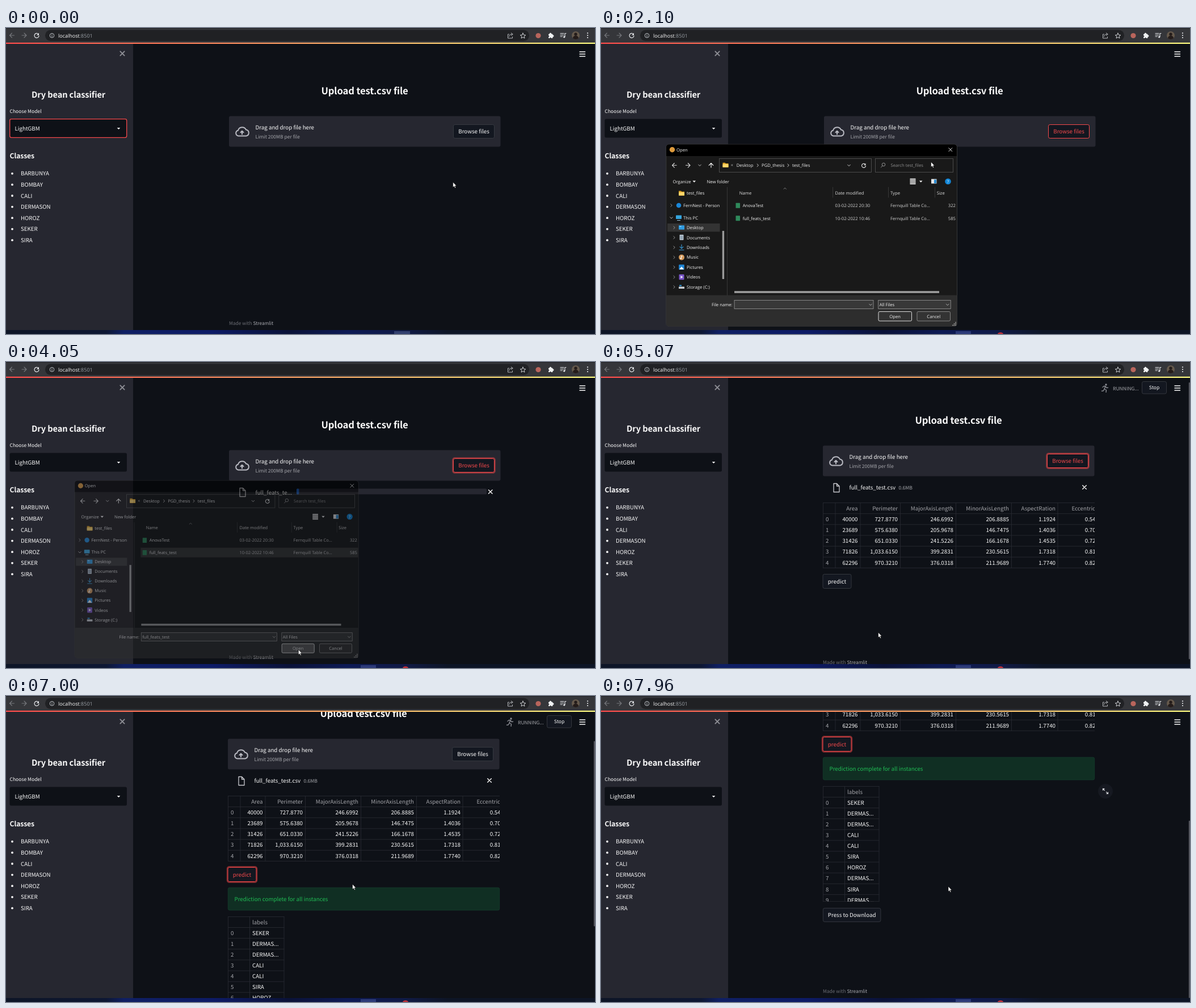
These frames come from a looping animation (1038 px wide and 540 px high, 8 s). An HTML page:

```html
<!DOCTYPE html>
<html lang="en">
<head>
<meta charset="utf-8">
<title>Dry bean classifier</title>
<style>
html,body{margin:0;width:100%;height:100%;overflow:hidden;background:#0e1117}
svg{display:block}
text{font-family:"Noto Sans CJK JP","Noto Sans CJK SC","Noto Sans CJK",sans-serif;fill:#fafafa;white-space:pre;text-rendering:geometricPrecision}
.ui text{font-family:"Open Sans","Noto Sans",sans-serif}
.line{fill:none;stroke:#fff;stroke-width:1;stroke-linecap:round;stroke-linejoin:round}
</style>
</head>
<body>
<svg id="stage" width="1038" height="540" viewBox="0 0 1038 540"></svg>
<script>
const BODY = 9.76, SMALL = 8.54, UI = 7.7, RED = '#f4494b';

// Drawing helpers; text is placed by the middle of its capitals
const text = (x, y, s, size = BODY, attr = '') =>
  `<text x="${x}" y="${(y + size * .365).toFixed(2)}" font-size="${size}" ${attr}>${s}</text>`;
const ui = (x, y, s, fill = '#f0f0f0', attr = '') => text(x, y, s, UI, `style="fill:${fill}" ${attr}`);
const rect = (x, y, w, h, fill, attr = '') =>
  `<rect x="${x}" y="${y}" width="${w}" height="${h}" fill="${fill}" ${attr}/>`;
const dot = (x, y, r, fill, attr = '') => `<circle cx="${x}" cy="${y}" r="${r}" fill="${fill}" ${attr}/>`;
const line = (d, stroke = '#fff', w = 1, attr = '') =>
  `<path class="line" d="${d}" style="stroke:${stroke};stroke-width:${w}" ${attr}/>`;
const group = (id, body, attr = '') => `<g id="${id}" ${attr}>${body}</g>`;
const at = (x, y, body) => `<g transform="translate(${x} ${y})">${body}</g>`;
const gray = 'style="fill:#a3a4a9"', mid = 'text-anchor="middle"', end = 'text-anchor="end"';
const cross = (x, y, r, c, w) => line(`M${x - r} ${y - r}l${2 * r} ${2 * r}m0 ${-2 * r}l${-2 * r} ${2 * r}`, c, w);
const chevron = (x, y, c, down) => line(down ? `M${x - 2.3} ${y - 1.2}l2.3 2.4l2.3 -2.4` : `M${x - 1.2} ${y - 2.3}l2.4 2.3l-2.4 2.3`, c, .9);
const caret = (x, y) => `<path d="M${x - 2.8} ${y - 1.3}h5.6l-2.8 2.9z" fill="#fafafa"/>`;
const arrow = (x, y, turn, c, r = 4) =>
  `<g transform="translate(${x} ${y}) rotate(${turn})">${line(`M${r} 0H${-r}M${-r} 0l${r} ${-r}M${-r} 0l${r} ${r}`, c, 1.1)}</g>`;
const reload = (x, y, r, c) => line(`M${x + r * .75} ${y - r * .65}A${r} ${r} 0 1 0 ${x + r} ${y + .6}`, c, 1.2) +
  `<path d="M${x + r} ${y - r - .6}v${r}h${-r}z" fill="${c}"/>`;

// A button with plain, hovered and focused looks
function button(id, x, y, w, h, label) {
  const box = (c, sw) => rect(x, y, w, h, '#131720', `rx="2.7" stroke="${c}" stroke-width="${sw}"`);
  const word = c => text(x + w / 2, y + h / 2, label, BODY, `${mid} style="fill:${c}"`);
  return group(id, box('#3d4047', .8) + word('#fafafa')) +
    group(id + 'Hover', box(RED, 1) + word(RED)) +
    group(id + 'Focus', rect(x - 1.2, y - 1.2, w + 2.4, h + 2.4, 'none', 'rx="3.5" stroke="#ff4b4b" stroke-opacity=".5" stroke-width="2"') + box(RED, 1) + word(RED));
}

function browser() {
  return `<g class="ui">` + rect(0, 0, 1038, 26, '#35363a') + rect(0, 0, 1038, 1, '#202124') +
    arrow(10.5, 13, 0, '#77797d') + arrow(32, 13, 180, '#77797d') + reload(54, 13.3, 4, '#e8eaed') +
    rect(69, 3.5, 853, 19.5, '#202124', 'rx="9.7"') +
    dot(81, 13.3, 3.8, 'none', 'stroke="#bdc1c6"') + line('M81 13v2.2M81 11.2v.1', '#bdc1c6', 1) +
    text(92, 13.3, 'localhost<tspan style="fill:#9aa0a6">:8501</tspan>', 9) +
    line('M886.5 11h-2v7h8v-2.500M886.500 15c.5-3 2.500-4 5-4M890.300 8.800l3 2.200l-3 2.200', '#c4c7cb', .9) +
    line('M911 9l1.400 3.200l3.400 .300l-2.600 2.300l.8 3.300l-3 -1.800l-3 1.800l.8 -3.300l-2.600 -2.300l3.400 -.300z', '#dfe1e5', .9) +
    dot(938, 13.5, 4.6, '#b9655c') +
    rect(956, 10.500, 7.500, 7.500, '#f1f3f4', 'rx="1"') + dot(959.5, 10.3, 1.700, '#f1f3f4') + dot(963.8, 14, 1.700, '#f1f3f4') + dot(956, 14.5, 1.300, '#35363a') + dot(959.6, 18, 1.300, '#35363a') +
    line('M977 9.500h6M977 12.300h6M977 15h3.500M985 15.500v-6h2', '#e8eaed', 1.100) + dot(983.7, 15.8, 1.600, '#e8eaed') +
    dot(1004, 13, 7, '#65594c') + dot(1004, 11, 2.700, '#241c1a') + `<path d="M999 18a5 4.500 0 0 1 10 0a7 7 0 0 1 -10 0z" fill="#241c1a"/>` +
    [9, 13, 17].map(y => dot(1025, y, 1.1, '#e8eaed')).join('') + `</g>` +
    rect(0, 25.8, 1038, 2.2, 'url(#glow)');
}

function sidebar() {
  const names = ['BARBUNYA', 'BOMBAY', 'CALI', 'DERMASON', 'HOROZ', 'SEKER', 'SIRA'];
  return rect(0, 28, 224, 505, '#262730') + cross(205, 45, 3.6, '#8d8e94', 2) +
    text(110, 117.5, 'Dry bean classifier', 14.6, `${mid} font-weight="600" letter-spacing="-.1"`) +
    text(6.5, 147, 'Choose Model', SMALL) +
    rect(6.5, 160.5, 206.5, 33, '#0e1117', 'rx="2.7"') +
    group('picked', rect(6.7, 160.700, 206, 32.600, 'none', `rx="2.700" stroke="${RED}" stroke-width="1.300"`)) +
    text(15.5, 177.5, 'LightGBM') + caret(198.5, 177.3) +
    text(6.5, 226, 'Classes', 12.2, 'font-weight="600" letter-spacing="-.1"') +
    names.map((n, i) => dot(11, 256.8 + i * 19.6, 1.9, '#fafafa') + text(26, 256.8 + i * 19.6, n)).join('');
}

// Grid lines of a table, given column and row edges
const grid = (xs, ys, w, h) => line(xs.map(x => `M${x} .5V${h}`).join('') + ys.map(y => `M.5 ${y}H${w}`).join(''), '#272a31', .9);

function features() {
  const heads = ['Area', 'Perimeter', 'MajorAxisLength', 'MinorAxisLength', 'AspectRation', 'Eccentricity'];
  const rows = [
    '40000 727.8770 246.6992 206.8885 1.1924 0.5450', '23689 575.6380 205.9678 146.7475 1.4036 0.7018',
    '31426 651.0330 241.5226 166.1678 1.4535 0.7257', '71826 1,033.6150 399.2831 230.5615 1.7318 0.8164',
    '62296 970.3210 376.0318 211.9689 1.7740 0.8260'];
  const right = [61.5, 132, 230, 328, 410, 491.5];
  const edges = [0, 1, 2, 3, 4, 5, 6].map(i => .5 + i * 19.15);
  return `<svg x="393" y="256" width="479" height="117">` +
    grid([.5, 22, 66, 136.5, 234.5, 332.5, 414], edges, 479, 115.4) +
    heads.map((s, i) => text(right[i], 10.3, s, BODY, `${end} ${gray}`)).join('') +
    rows.map((r, j) => text(5, 29.400 + j * 19.15, j, BODY, gray) +
      r.split(' ').map((s, i) => text(right[i], 29.4 + j * 19.15, s, BODY, `${end} font-weight="500"`)).join('')).join('') + `</svg>`;
}

function labels() {
  const names = 'SEKER DERMAS... DERMAS... CALI CALI SIRA HOROZ DERMAS... SIRA DERMAS...'.split(' ');
  return `<svg x="393" y="469" width="100" height="204">` +
    grid([.5, 38.5, 99], [.5, ...names.map((n, i) => 19.5 + i * 19.1), 203.6], 99, 204) +
    text(43, 10.3, 'labels', BODY, gray) +
    names.map((n, i) => text(5, 29.2 + i * 19.1, i, BODY, gray) + text(43, 29.2 + i * 19.1, n, BODY, 'font-weight="500"')).join('') + `</svg>`;
}

const expand = (id, y) => group(id, dot(891, y, 13, '#161921') +
  line(`M889.500 ${y - 1.500}l-3 -3m0 2.700v-2.700h2.700M892.500 ${y + 1.500}l3 3m0 -2.700v2.700h-2.700`, '#d5d6da', 1.2));

function page() {
  const doc = line('M412 222.500h5.500l4.500 4.500v10.500h-10zM417.500 222.500v4.500h4.500', '#c9cacf', 1.3);
  return text(632, 110.5, 'Upload test.csv file', 16.7, `${mid} font-weight="600" letter-spacing="-.15"`) +
    rect(393, 155.5, 478.5, 54, '#262730', 'rx="2.7"') +
    line('M409.500 190.500a5 5 0 0 1 -.500 -9.800a7.500 7.500 0 0 1 14 -1.200a5.600 5.600 0 0 1 .500 11z', '#b9bac2', 2) +
    line('M416 187.500v-5M413.500 184.300l2.500 -2.500l2.500 2.500', '#b9bac2', 2) +
    text(439.5, 175.5, 'Drag and drop file here') + text(439.5, 192.3, 'Limit 200MB per file', SMALL, gray) +
    button('browse', 788.5, 170.5, 72, 24, 'Browse files') +
    group('upload', doc + text(439.5, 230, 'full_feats_te...') + rect(512, 223.500, 335, 10, '#262730', 'rx="1.500"') +
      rect(512, 223.500, 3, 10, '#1f5fbf', 'id="bar" rx="1.500"') + cross(853.7, 229, 3.3, '#fafafa', 1.4)) +
    group('file', doc + text(439.5, 229.3, 'full_feats_test.csv') + text(526.5, 229.5, '0.6MB', SMALL, gray) + cross(854, 229, 3.3, '#fafafa', 1.4)) +
    group('data', features() + button('predict', 393, 382.5, 50, 25, 'predict') + expand('zoomData', 265)) +
    group('result', rect(393.3, 418.2, 478.4, 39.8, '#102f23', 'rx="2.700" stroke="#164230" stroke-width=".7"') +
      text(404.5, 438.3, 'Prediction complete for all instances', BODY, 'style="fill:#20bd55"') + labels() + expand('zoomLabels', 478)) +
    group('download', button('save', 393.4, 684.4, 101.5, 24, 'Press to Download')) +
    group('footer', text(393, 520.5, 'Made with <tspan style="fill:#a9aab0">Streamlit</tspan>', 8.4, 'style="fill:#6c6e75"'));
}

function header() {
  return line('M1011 42h9.500M1011 46h9.500M1011 50h9.500', '#fafafa', 1.5) +
    group('running', dot(890, 40, 1.7, '#8b8d94') +
      line('M889 43l-2 4.500l3.500 2l-.5 3.800M887 47.500l-1.500 3.200l-3 .5M884 44.500l2.500 -2l2.500 .5l2 2.500l2.500 -.3', '#8b8d94', 1.4) +
      text(902, 47, 'RUNNING...', SMALL, gray) +
      rect(953.5, 34.5, 43, 21.500, '#131720', 'rx="2.700" stroke="#3d4047" stroke-width=".8"') + text(975, 45.3, 'Stop', SMALL, mid));
}

const folder = (x, y) => `<path d="M${x - 5} ${y - 4}h4l1.300 1.300h4.700v7h-10z" fill="#e0a526"/>` + rect(x - 5, y - 1.4, 10, 5.4, '#ffd66b', 'rx=".7"');

function tree() {
  const icons = [
    rect(-5, -4, 10, 7.500, '#2f9be0', 'rx=".8"') + rect(-3.500, -2.500, 3, 1, '#bfe5ff'),
    rect(-3.5, -5, 7, 9.500, '#b9c6d2', 'rx=".8"') + line('M-2 -2h4M-2 0h4M-2 2h4', '#5d7488', .8),
    line('M0 -5v7M-3 -1l3 3l3 -3M-4 4.500h8', '#3a9bd8', 1.1),
    dot(0, 0, 5, '#d39a5c') + line('M-.5 2v-4.500l2 1', '#fff', 1) + dot(-1.3, 2, 1.2, '#fff'),
    rect(-4.8, -4.5, 9.600, 9, '#1e86d6', 'rx="1"') + '<path d="M-4 4l4 -5l4 5z" fill="#fff"/>',
    rect(-4.5, -4.8, 9, 9.600, '#7b57c9', 'rx="1"') + '<path d="M-1.500 -2.300l4 2.300l-4 2.300z" fill="#fff"/>',
    rect(-5, -.5, 10, 3.500, '#c9ced3', 'rx=".6"') + rect(-4, -3.500, 4, 2, '#2f9be0')];
  const names = ['Desktop', 'Documents', 'Downloads', 'Music', 'Pictures', 'Videos', 'Storage (C:)'];
  return folder(142, 291.5) + ui(151, 291.5, 'test_files') +
    chevron(124, 313, '#a0a0a0') + dot(137, 313, 4.3, '#1b87d8') + ui(145, 313, 'FernNest - Person') +
    chevron(124, 335, '#d0d0d0', 1) + rect(132, 330.5, 10, 6.5, '#35a5dd', 'rx=".7"') + line('M134.500 339.500h5', '#9fc7dd', 1) + ui(145, 335, 'This PC') +
    rect(117, 345, 92.5, 14.5, '#333') +
    names.map((n, i) => { const y = 352.3 + i * 17.45; return chevron(129, y, '#a0a0a0') + at(142, y, icons[i]) + ui(151, y, n); }).join('') +
    rect(213.7, 358, 3.4, 85, '#9a9a9a');
}

function dialog() {
  const row = (y, name, date, size) => rect(237.5, y - 4.5, 7.500, 9, '#2f8a5b', 'rx=".6"') + ui(249.7, y, name) +
    ui(412.5, y, date, '#d2d2d2') + ui(510, y, 'Fernquill Table Co...', '#d2d2d2') + ui(625, y, size, '#d2d2d2', end);
  const field = (x, w) => rect(x, 480.5, w, 15, '#383838', 'stroke="#9b9b9b" stroke-width=".8"');
  const push = (x, label, c, id) => rect(x, 500.5, 58.5, 16.500, '#333', `id="${id}" rx="2" stroke="${c}" stroke-width=".9"`) + ui(x + 29.2, 508.8, label, '#f0f0f0', mid);
  return rect(114.8, 205.3, 512.7, 321, '#191919', 'rx="5" stroke="#404040" stroke-width=".8"') +
    '<path d="M115 226v-16a5 5 0 0 1 5 -4.500h502a5 5 0 0 1 5 4.500v16z" fill="#000"/>' +
    '<path d="M115 471.500h512.300v50a5 5 0 0 1 -5 5h-502.300a5 5 0 0 1 -5 -5z" fill="#2d2d2d"/>' +
    dot(125.5, 214.7, 4.7, '#dd9a3c') + ui(133, 215, 'Open') + cross(615.8, 214.7, 3, '#fff', .9) +
    arrow(129.3, 242.3, 0, '#e0e0e0', 3.8) + arrow(153.3, 242.3, 180, '#e0e0e0', 3.8) + chevron(174, 242.3, '#ccc', 1) + arrow(194, 242.3, 90, '#fff', 3.8) +
    rect(208.5, 230.5, 268, 24, '#191919', 'stroke="#515151" stroke-width=".9"') + folder(219.5, 241.7) + ui(229, 241.2, '«', '#c0c0c0') +
    ui(238.7, 242.3, 'Desktop') + chevron(276.3, 242.3, '#ddd') + ui(283, 242.3, 'PGD_thesis') + chevron(330, 242.3, '#ddd') + ui(337, 242.3, 'test_files') +
    chevron(437, 242.5, '#ddd', 1) + reload(463, 242.8, 3.5, '#ddd') +
    rect(483.5, 230.5, 137, 24, '#191919', 'stroke="#515151" stroke-width=".9"') + dot(498, 241, 2.8, 'none', 'stroke="#9a9a9a" stroke-width=".9"') +
    line('M496 243.200l-2.500 2.800', '#9a9a9a', .9) + ui(510.5, 242.5, 'Search test_files', '#8f8f8f') +
    ui(126.5, 271, 'Organize') + caret(164.3, 270.8) + ui(186.5, 271, 'New folder') +
    rect(544.5, 265.5, 10, 10.500, '#d0d0d0') + line('M545 268h9M545 270.700h9M545 273.400h9', '#444', .8) + caret(563.7, 270.8) +
    rect(582, 266.5, 9.5, 8, '#e8e8e8') + rect(587, 267.500, 4, 6.500, '#2b8bd0') +
    dot(611.5, 270.7, 5.3, '#1287d8') + ui(611.5, 270.7, '?', '#fff', mid) +
    tree() + line('M222.500 281v190.500M408.500 281v18M506.500 281v18M588.500 281v18', '#3c3c3c', .9) +
    line('M322 284.200l2.200 -2l2.200 2', '#999', .8) +
    ui(243.7, 290.7, 'Name', '#ddd') + ui(412.5, 290.7, 'Date modified', '#ddd') + ui(510, 290.7, 'Type', '#ddd') + ui(591.7, 290.7, 'Size', '#ddd') +
    rect(234, 304.500, 393, 17.5, '#4d4d4d', 'id="hoverTop"') + rect(234, 326.7, 393, 17.5, '#4d4d4d', 'id="hoverRow"') +
    rect(234, 326.7, 393, 17.5, '#777', 'id="chosen"') +
    row(313.3, 'AnovaTest', '03-02-2022 20:30', '322') + row(335.7, 'full_feats_test', '10-02-2022 10:46', '585') +
    rect(235, 464.2, 361, 3.6, '#9d9d9d') +
    ui(195, 488.3, 'File name:') + field(235, 245) + group('typed', ui(237, 488.3, 'full_feats_test')) + chevron(475, 488.3, '#bbb', 1) +
    field(488.7, 127.5) + ui(490.7, 488.3, 'All Files') + chevron(610.7, 488.3, '#bbb', 1) +
    push(489, 'Open', '#f0f0f0', 'openBtn') + push(557, 'Cancel', '#8f8f8f', 'cancelBtn') +
    [[625, 519.5], [625, 522], [622.5, 522], [625, 524.5], [622.5, 524.5], [620, 524.5]].map(p => rect(p[0] - .7, p[1] - .7, 1.5, 1.5, '#bbb')).join('');
}

const taskbar = () => rect(0, 533, 1038, 7, 'url(#dusk)') + rect(684, 535, 28, 5, '#33406f', 'id="tabA"') +
  rect(625, 535, 27, 5, '#2c3a78', 'id="tabB"') + `<path id="alert" d="M699 540a5 3 0 0 1 10 0z" fill="#b8303a"/>`;

const pointer = group('arrow', '<path d="M0 0v9.200l2.100 -1.900l1.500 3.200l1.500 -.7l-1.500 -3.100h2.800z" fill="#fff" stroke="#000" stroke-width=".6"/>') +
  group('hand', '<path d="M-.9 .8q.9 -1.200 1.800 0v3.700l3.600 .8q1 .3 .9 1.500l-.8 4.800h-4.800l-3 -4.300q-.2 -1.200 1 -.9l1.300 1z" fill="#fff" stroke="#000" stroke-width=".6"/>');

const stops = list => list.map(([o, c]) => `<stop offset="${o}" stop-color="${c}"/>`).join('');
document.getElementById('stage').innerHTML =
  `<defs><linearGradient id="glow">${stops([[0, '#ff4b4b'], [1, '#fffd80']])}</linearGradient>` +
  `<linearGradient id="dusk">${stops([[0, '#0d1526'], [.17, '#0d1733'], [.2, '#0f1f63'], [.35, '#0d1b66'], [.48, '#0a1238'], [.58, '#0d1a55'], [.68, '#101a45'], [.75, '#0d1526'], [1, '#0d1526']])}</linearGradient></defs>` +
  rect(0, 0, 1038, 540, '#0e1117') +
  `<svg x="224" y="28" width="814" height="505" viewBox="224 28 814 505">${group('page', page())}${rect(1035.8, 28, 2.2, 100, '#54565e', 'id="thumb" rx="1"')}${header()}</svg>` +
  sidebar() + browser() + taskbar() + group('dialog', dialog(), 'class="ui"') + group('pointer', pointer);

// Motion tables: time, then values
const PATH = [[70, 787.7, 272], [810, 824, 182], [880, 823, 181], [1290, 823, 181], [1500, 817, 181], [1650, 817, 181], [2030, 600, 230],
  [2500, 300, 332], [2790, 300, 332], [2960, 411, 400], [3190, 411, 400], [3750, 515.3, 507.5], [4860, 515.3, 507.5],
  [5500, 410.3, 388.3], [6300, 410.3, 388.3], [6700, 610.5, 332], [7470, 610.5, 332], [7800, 612, 336]];
const SCROLL = [[4950, 0], [5200, 17], [6720, 17], [7330, 153], [7470, 153], [7900, 310]];
const FADE = [[1650, 0, .92], [1850, 1, 1], [3960, 1, 1], [4050, .52, .976], [4140, 0, .95]];
const BAR = [[4050, 3], [4280, 335]];
const STATUS = [[4280, 0], [4350, 1], [5560, 1], [5690, 0], [5900, 0], [5960, 1], [7560, 1], [7650, 0]];

const linear = u => u, smooth = u => u * u * (3 - 2 * u);
function track(table, t, ease = linear) {
  if (t <= table[0][0]) return table[0].slice(1);
  const i = table.findIndex(k => k[0] > t);
  if (i < 0) return table[table.length - 1].slice(1);
  const a = table[i - 1], b = table[i], u = ease((t - a[0]) / (b[0] - a[0]));
  return a.slice(1).map((v, n) => v + (b[n + 1] - v) * u);
}

const el = {};
document.querySelectorAll('[id]').forEach(e => el[e.id] = e);
const show = (id, on) => el[id].style.display = on ? '' : 'none';
const set = (id, name, v) => el[id].setAttribute(name, v);
function look(id, hover, focus) {
  show(id, !hover && !focus); show(id + 'Hover', hover && !focus); show(id + 'Focus', focus);
}

function render(t) {
  const [x, y] = track(PATH, t, smooth), [scroll] = track(SCROLL, t);
  const [alpha, scale] = track(FADE, t), [status] = track(STATUS, t);
  const total = t < 4500 ? 505 : t < 5980 ? 522 : t < 7600 ? 780 : 815;
  const hasBar = total > 505, open = t > 1650 && t < 4140;

  set('page', 'transform', `translate(${hasBar ? -2 : 0} ${-Math.round(scroll)})`);
  show('thumb', hasBar);
  set('thumb', 'y', 28 + 505 * scroll / total);
  set('thumb', 'height', 505 * 505 / total);
  set('footer', 'transform', `translate(0 ${total - 505})`);

  const onBrowse = t < 4140 && t > 600 && (t > 1290 || y < 194);
  const onPredict = t > 5000 && x < 442 && y < 407 - scroll;
  look('browse', onBrowse, t >= 3900 && t < 5830);
  look('predict', onPredict, t >= 5830);
  look('save', false, false);
  show('picked', t < 1290);
  show('upload', t >= 3950 && t < 4320);
  set('bar', 'width', track(BAR, t)[0]);
  show('file', t >= 4320);
  show('data', t >= 4500);
  show('result', t >= 5980);
  show('download', t >= 7600);
  const over = (top, bottom) => x > 450 && t > 6300 && y > top - scroll && y < bottom - scroll;
  show('zoomData', over(256, 372));
  show('zoomLabels', over(469, 673));
  el.running.style.opacity = status;

  show('dialog', open);
  el.dialog.style.opacity = alpha;
  set('dialog', 'transform', `translate(371 366) scale(${scale}) translate(-371 -366)`);
  show('hoverTop', t > 2000 && t < 2790 && y > 304 && y < 322);
  show('hoverRow', t > 2000 && t < 2790 && y > 326);
  show('chosen', t >= 2790);
  set('chosen', 'fill', t < 3850 ? '#777' : '#363636');
  show('typed', t >= 2790);
  set('openBtn', 'fill', t > 3680 ? '#5a5a5a' : '#333');

  show('tabA', t < 1290); show('tabB', t >= 1290); show('alert', t >= 500);
  const hand = (onBrowse && t < 1400) || onPredict;
  show('hand', hand); show('arrow', !hand);
  set('pointer', 'transform', `translate(${x} ${y})`);
}

const begin = performance.now();
function tick() {
  render((performance.now() - begin) % 8000);
  requestAnimationFrame(tick);
}
tick();
</script>
</body>
</html>
```
